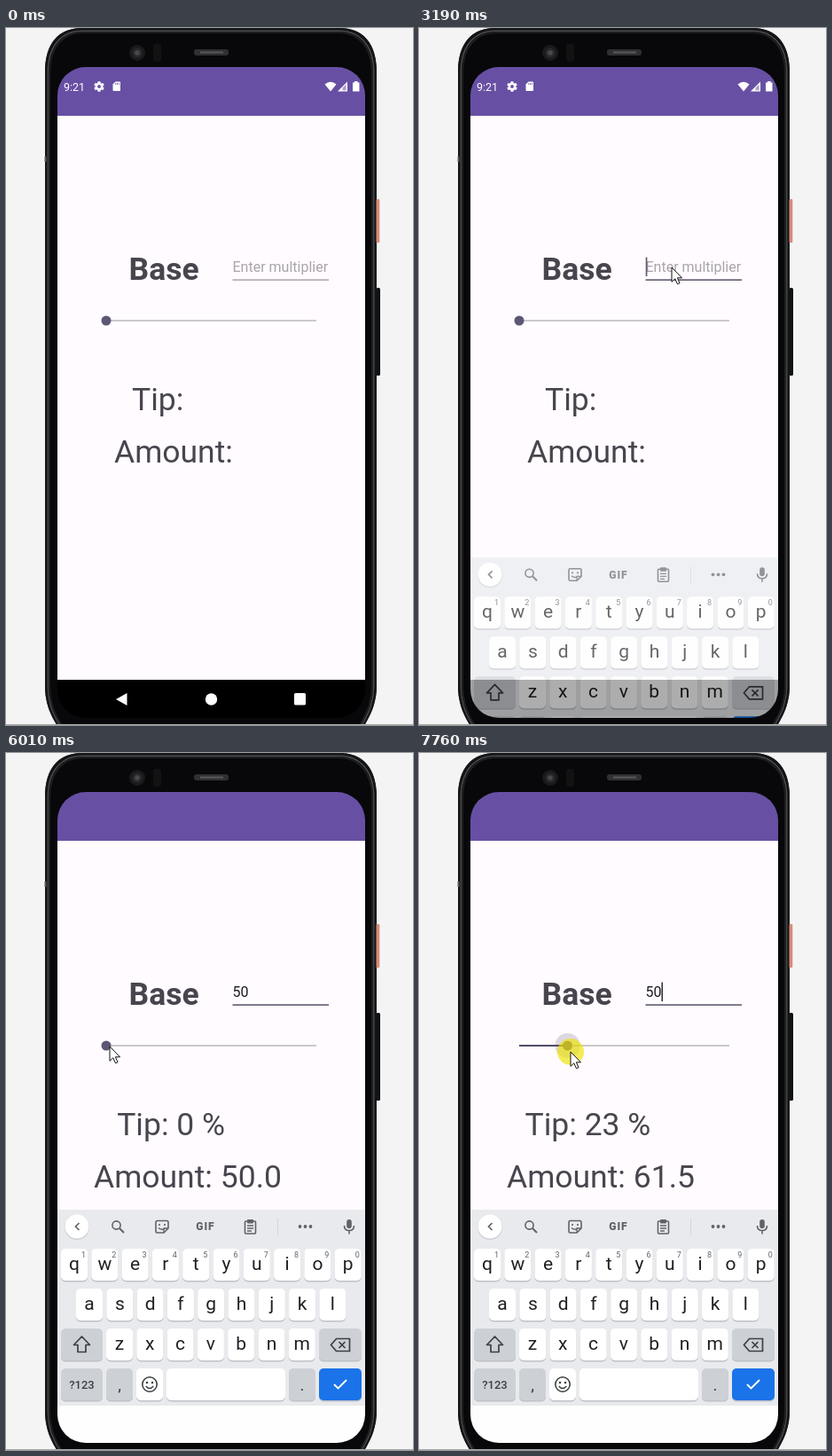
An HTML page for the animation above (8 s loop, 459 by 786 pixels).

```html
<!DOCTYPE html>
<html lang="en">
<head>
<meta charset="utf-8">
<title>Tip calculator</title>
<style>
html, body { margin: 0; width: 100%; height: 100%; overflow: hidden; background: #f4f4f4; }
svg { display: block; width: 100vw; height: 100vh; }
text { font-family: Roboto, "Liberation Sans", sans-serif; white-space: pre; }
</style>
</head>
<body>
<svg id="stage" viewBox="0 0 459 786" xmlns="http://www.w3.org/2000/svg"></svg>
<script>
const LOOP = 8000;
const INK = '#49454f', ACCENT = '#625b71';

const rect = (x, y, w, h, fill, r = 0, extra = '') =>
  `<rect x="${x}" y="${y}" width="${w}" height="${h}" rx="${r}" fill="${fill}" ${extra}/>`;
const disc = (x, y, r, fill, extra = '') =>
  `<circle cx="${x}" cy="${y}" r="${r}" fill="${fill}" ${extra}/>`;
const path = (d, fill, extra = '') => `<path d="${d}" fill="${fill}" ${extra}/>`;
const line = (d, color, w, extra = '') =>
  path(d, 'none', `stroke="${color}" stroke-width="${w}" ${extra}`);
const text = (x, y, size, fill, str, extra = '') =>
  `<text x="${x}" y="${y}" font-size="${size}" fill="${fill}" ${extra}>${str}</text>`;
const group = (id, body, extra = '') => `<g id="${id}" ${extra}>${body}</g>`;
const MID = 'text-anchor="middle"';

// Outline of the case, inset by d
const shell = d =>
  `M${60 + d} 790C${52 + d} 778 ${44 + d} 764 ${44 + d} 742V50C${44 + d} ${16 + d} ${60 + d} ${d} 86 ${d}` +
  `H376C${402 - d} ${d} ${418 - d} ${16 + d} ${418 - d} 50V742C${418 - d} 764 ${409 - d} 778 ${402 - d} 790`;

function phone() {
  return path(shell(0) + 'Z', '#08080a') +
    line(shell(1), '#161718', 2) + line(shell(3.2), '#4b4e4f', 1.4) + line(shell(5), '#1e1f20', 2) +
    rect(43.5, 145, 2, 6, '#5b5c5e') +
    rect(417.5, 193, 3.8, 49, '#d98b78', 1) + rect(417.5, 293, 4.5, 99, '#111214', 1.5) +
    disc(148, 28, 9, '#1a1a1c') + disc(148, 28, 5.5, '#29292b') + disc(148, 28, 2.8, '#49494b') +
    rect(166, 18, 9, 20, '#121213', 3) +
    rect(212, 24, 39, 7, '#303032', 3) + line('M219 27.5H245', '#59595b', 2);
}

function statusBar() {
  let teeth = '';
  for (let a = 0; a < 360; a += 60) teeth += rect(103.4, 60.2, 3.2, 3, '#fff', .6, `transform="rotate(${a} 105 66)"`);
  return text(65, 70.8, 12.5, '#fff', '9:21') +
    teeth + `<circle cx="105" cy="66" r="3.1" fill="none" stroke="#fff" stroke-width="2.4"/>` +
    path('M123.5 60.5H128Q129 60.5 129 61.5V70Q129 71 128 71H121.5Q120.5 71 120.5 70V63.5Z', '#fff') +
    line('M123.7 62V64M125.5 62V64M127.3 62V64', '#6750a4', .8) +
    path('M359.5 63.5Q366 58 372.5 63.5L366 71.5Z', '#fff') +
    path('M374 71.5L385 60.5V71.5Z', '#fff') + path('M379.5 70.2V67.5L383.7 63.4V70.2Z', '#6750a4', 'opacity=".55"') +
    path('M391 61.5H393V60H396.5V61.5H398.5V71.5H391Z', '#fff');
}

function key(x, y, w, fill = '#fff') {
  return rect(x, y + 1, w, 36.5, '#bfc2c7', 5) + rect(x, y, w, 36, fill, 5);
}

function keyRow(letters, x0, y) {
  return [...letters].map((c, i) => {
    const x = x0 + i * 34.3;
    return key(x, y, 30) + text(x + 15, y + 24.2, 21, '#1f2023', c, MID);
  }).join('');
}

function toolbar() {
  const g = '#5f6368';
  const box = 'fill="none" stroke="#5f6368" stroke-width="1.6"';
  return disc(80, 535, 14, '#cfd1d5') + disc(80, 534, 13.5, '#fff') +
    line('M82.5 530L78.5 534L82.5 538', g, 1.7) +
    `<circle cx="124.5" cy="532.5" r="4.6" ${box}/>` + line('M128 536L133 541', g, 2) +
    `<path d="M170.5 527.5H181.5Q183 527.5 183 529V536L178 541H170.5Q169 541 169 539.5V529Q169 527.5 170.5 527.5Z" ${box}/>` +
    disc(173, 532, 1.1, g) + disc(179, 532, 1.1, g) + line('M172 535.5Q176 539 180 535.5M178 541V536H183', g, 1.3) +
    text(225, 538.3, 12, g, 'GIF', MID + ' font-weight="900" letter-spacing="1"') +
    `<rect x="269.5" y="528" width="12" height="14" rx="1" ${box}/>` +
    rect(272, 526, 7, 4.5, g, 1) + line('M272 533H279M272 536H279M272 539H277', g, 1.3) +
    line('M306.5 525V544', '#d3d5d9', 1) +
    [331.5, 337.5, 343.5].map(x => disc(x, 534, 1.9, g)).join('') +
    rect(384.2, 526, 5.6, 10, g, 2.8) + line('M381.5 533Q381.5 538.5 387 538.5T392.5 533M387 538.5V542.5', g, 1.6);
}

function keyboard() {
  const dim = '#cdd0d5', g = '#3c4043';
  const digits = [...'1234567890'].map((d, i) => text(87.5 + i * 34.3, 569, 9, '#5f6368', d, MID)).join('');
  return rect(58, 515, 347, 221, '#e8eaed') + rect(58, 736, 347, 130, '#fefefe') +
    toolbar() +
    keyRow('qwertyuiop', 62, 559) + keyRow('asdfghjkl', 79, 604) + keyRow('zxcvbnm', 113, 649) + digits +
    key(62, 649, 47, dim) + line('M85.5 658L94.5 667.5H90V675.5H81V667.5H76.5Z', g, 1.7, 'stroke-linejoin="round"') +
    key(353, 649, 48, dim) + line('M372.5 660.5H387.5V674.5H372.5L366.5 667.5ZM375.5 664L382.5 671M382.5 664L375.5 671', g, 1.7) +
    key(62, 694, 47, dim) + text(85.5, 717, 13, g, '?123', MID + ' font-weight="500"') +
    key(113, 694, 30, dim) + text(128, 719, 19, g, ',', MID) +
    key(147, 694, 30) + `<circle cx="162" cy="712" r="8.2" fill="none" stroke="${g}" stroke-width="1.6"/>` +
    disc(159, 710, 1.3, g) + disc(165, 710, 1.3, g) + line('M157.7 714Q162 719 166.3 714', g, 1.5) +
    key(181, 694, 134) + key(319, 694, 30, dim) + text(334, 719, 19, g, '.', MID) +
    key(353, 694, 48, '#1a73e8') + line('M370 712L374.5 716.5L384 707', '#fff', 1.9);
}

function screen() {
  return rect(58, 99, 347, 637, '#fffbfe') + rect(58, 44, 347, 55, '#6750a4') +
    group('status', statusBar()) +
    text(138.6, 284.3, 35.5, INK, 'Base', 'font-weight="700"') +
    text(255.5, 275.3, 16, '#aaa4ab', 'Enter multiplier', 'id="entry"') +
    rect(255.5, 283.3, 108.5, 1.6, '#b0a9b0', 0, 'id="under"') +
    rect(255.7, 258.5, 1.7, 21.5, ACCENT, 0, 'id="caret"') +
    rect(113, 329, 237, 2, '#cbc8cd') + rect(113, 329, 0, 2, '#514a66', 0, 'id="fill"') +
    disc(113, 330, 14, ACCENT, 'id="halo" opacity=".22"') + disc(113, 330, 5.5, '#5d5674', 'id="thumb"') +
    text(142, 431.2, 35.5, INK, 'Tip:', 'id="tip"') +
    text(122, 490.2, 35.5, INK, 'Amount:', 'id="amount"') +
    rect(58, 735, 347, 43, '#000') +
    group('nav', path('M124 757L136.5 750V764Z', '#fff') +
      disc(231.5, 757, 6.7, '#fff') + rect(325, 750, 13, 13.5, '#fff', 1.5)) +
    group('keys', keyboard()) +
    group('ghost', line('M124.5 758L136.5 765M225 758Q226 764 231.5 764T238 758M325.5 752V764.5H338V752', '#ececec', 1));
}

const stage = document.getElementById('stage');
stage.innerHTML = `<clipPath id="glass"><rect x="58" y="44" width="347" height="734" rx="32"/></clipPath>` +
  rect(0, 0, 459, 786, '#f4f4f4') + phone() +
  group('screen', screen(), 'clip-path="url(#glass)"') +
  rect(0, 785, 459, 1, '#a9a9a9') +
  disc(0, 0, 15, '#efe400', 'id="press" opacity=".66"') +
  group('pointer', path('M0 0V16.3L3.8 12.8L6.5 18.8L9 17.7L6.4 11.8H11.5Z', '#fff', 'stroke="#111" stroke-width="1" stroke-linejoin="round"'));

const el = {};
stage.querySelectorAll('[id]').forEach(n => el[n.id] = n);
const set = (n, attrs) => { for (const k in attrs) n.setAttribute(k, attrs[k]); };
const show = (n, on) => n.setAttribute('visibility', on ? 'visible' : 'hidden');
const within = (t, ...spans) => spans.some(([a, b]) => t >= a && t < b);

// Time, x, y of the pointer
const ROUTE = [
  [310, 405, 738], [520, 328, 572], [700, 273, 455], [860, 258, 372], [1010, 268, 318],
  [1080, 275, 300], [1150, 280, 294], [1290, 279, 282], [1430, 285, 270],
  [4240, 285, 270], [4500, 262, 283], [5000, 185, 310], [5500, 125, 329], [5750, 117, 331],
  [6290, 117, 331], [7055, 152, 333], [7760, 171, 337]
];
const PERCENT = [[6350, 0], [7055, 14], [7760, 23]];

function along(keys, t) {
  if (t <= keys[0][0]) return keys[0].slice(1);
  const i = keys.findIndex(k => k[0] > t);
  if (i < 0) return keys[keys.length - 1].slice(1);
  const a = keys[i - 1], b = keys[i], p = (t - a[0]) / (b[0] - a[0]);
  return a.slice(1).map((v, j) => v + (b[j + 1] - v) * p);
}

const held = t => 310 + Math.floor((t - 298) / 70.28) * 70.28;

function draw(time) {
  const t = Math.min(time, 7760), h = held(t);
  const focused = t >= 1990, typed = t >= 3515, dragging = t >= 6290;

  const [x, y] = along(ROUTE, h);
  show(el.pointer, t >= 310);
  set(el.pointer, { transform: `translate(${x} ${y})` });
  show(el.press, within(t, [1630, 1850]) || dragging);
  set(el.press, { cx: x, cy: y });

  set(el.under, { fill: focused ? ACCENT : '#b0a9b0' });
  el.entry.textContent = typed ? '50' : 'Enter multiplier';
  set(el.entry, { fill: typed ? '#1c1b1f' : '#aaa4ab' });
  show(el.caret, typed ? Math.floor((t - 3480) / 500) % 2 === 0 : within(t, [1990, 2380], [2910, 3515]));
  set(el.caret, { x: typed ? 273.5 : 255.7, width: typed ? 1.4 : 1.7, fill: typed ? '#1c1b1f' : ACCENT });

  const pct = Math.round(along(PERCENT, h)[0]);
  const knob = 113 + 2.37 * pct;
  set(el.fill, { width: knob - 113 });
  set(el.thumb, { cx: knob });
  set(el.halo, { cx: knob });
  show(el.halo, dragging);
  el.tip.textContent = typed ? `Tip: ${pct} %` : 'Tip:';
  set(el.tip, { x: !typed ? 142 : pct < 10 ? 125.2 : 119.5 });
  el.amount.textContent = typed ? `Amount: ${(50 + pct / 2).toFixed(1)}` : 'Amount:';
  set(el.amount, { x: typed ? 99 : 122 });

  // The keyboard slides up and fades in over the dark bar
  const rise = Math.max(0, Math.min(1, Math.floor((t - 3190) / 70) / 4));
  const left = (1 - rise) ** 2;
  show(el.keys, t >= 3190);
  show(el.nav, t < 3190);
  set(el.keys, { transform: `translate(0 ${82.3 * left})`, opacity: 1 - .32 * left });

  const lit = within(t, [0, 3980], [4480, 4980], [5480, 6010], [6480, 7690]);
  show(el.status, lit);
  show(el.ghost, lit && within(t, [3515, 6840]));
}

function tick(now) {
  draw(now % LOOP);
  requestAnimationFrame(tick);
}
draw(0);
requestAnimationFrame(tick);
</script>
</body>
</html>
```
